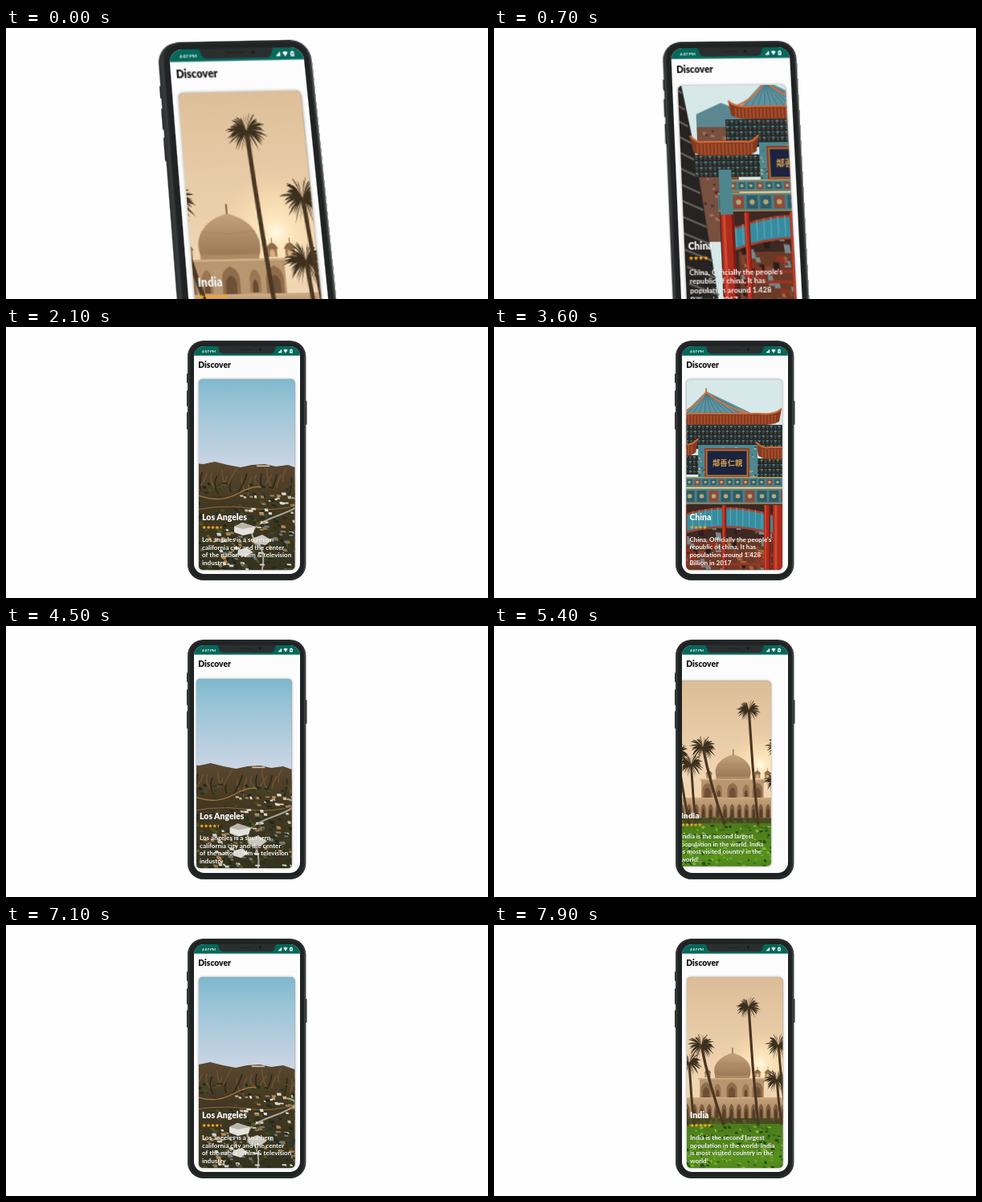
These frames come from a looping animation (600x338 px, 8 s). An HTML page:

```html
<!DOCTYPE html>
<html lang="en">
<head>
<meta charset="utf-8">
<title>Discover</title>
<style>
  html, body { margin: 0; width: 100%; height: 100%; overflow: hidden; background: #fefefe; }
  svg { display: block; width: 600px; height: 338px; overflow: visible; transform-origin: 0 0; }
  text { font-family: Lato, "Open Sans", sans-serif; font-weight: 700; }
  .head { font-weight: 900; }
  .cjk { font-family: "Noto Sans CJK SC", "Noto Sans CJK", sans-serif; }
  .copy { fill: #fff; filter: drop-shadow(0 .4px .6px rgba(0, 0, 0, .45)); }
  .shadow { filter: drop-shadow(0 .6px 1.6px rgba(0, 0, 0, .4)); }
</style>
</head>
<body>
<svg id="phone" viewBox="0 0 600 338">
  <defs>
    <clipPath id="screen"><rect x="234" y="24" width="132" height="284" rx="13"/></clipPath>
    <clipPath id="card"><rect x="240" y="65" width="119.5" height="238" rx="5"/></clipPath>
    <linearGradient id="dusk" x2="0" y2="1">
      <stop offset="0" stop-color="#d2b28e"/><stop offset=".35" stop-color="#e3c5a0"/><stop offset=".7" stop-color="#f0d5b2"/>
    </linearGradient>
    <radialGradient id="sun">
      <stop offset="0" stop-color="#fffbe8"/><stop offset=".2" stop-color="#ffebc2" stop-opacity=".9"/>
      <stop offset="1" stop-color="#ffdba4" stop-opacity="0"/>
    </radialGradient>
    <linearGradient id="stone" x2="0" y2="1">
      <stop offset="0" stop-color="#c4a27b"/><stop offset="1" stop-color="#987754"/>
    </linearGradient>
    <linearGradient id="lawn" x2="0" y2="1">
      <stop offset="0" stop-color="#4d7a1c"/><stop offset=".4" stop-color="#56901d"/><stop offset="1" stop-color="#2a5410"/>
    </linearGradient>
    <linearGradient id="day" x2="0" y2="1">
      <stop offset="0" stop-color="#5ba6c1"/><stop offset=".45" stop-color="#97c3d6"/><stop offset="1" stop-color="#d3d8e6"/>
    </linearGradient>
    <linearGradient id="hill" x2="0" y2="1">
      <stop offset="0" stop-color="#5b4730"/><stop offset=".3" stop-color="#433822"/><stop offset="1" stop-color="#2b301e"/>
    </linearGradient>
    <linearGradient id="body" x2="1" y2="0">
      <stop offset="0" stop-color="#3d4140"/><stop offset=".025" stop-color="#262929"/>
      <stop offset=".97" stop-color="#292c2c"/><stop offset="1" stop-color="#454948"/>
    </linearGradient>
  </defs>

  <g id="side">
    <g fill="#232626">
      <rect x="225" y="58" width="3" height="12" rx="1"/><rect x="225" y="79" width="3" height="20" rx="1"/>
      <rect x="225" y="106" width="3" height="22" rx="1"/><rect x="371.5" y="92" width="3" height="30" rx="1"/>
    </g>
    <rect x="226" y="17.500" width="147" height="298" rx="20" fill="#333636"/>
  </g>
  <rect x="226" y="17" width="147.5" height="299" rx="20" fill="url(#body)"/>
  <rect x="228.5" y="19.5" width="142.5" height="294" rx="18" fill="#202323"/>
  <g clip-path="url(#screen)">
    <rect x="234" y="24" width="132" height="284" fill="#fbfcfb"/>
    <g id="deck"></g>
    <rect x="234" y="24" width="132" height="11.7" fill="#04685a"/>
    <text class="head" x="239.3" y="51.4" font-size="10.3" fill="#111">Discover</text>
    <text x="244" y="32" font-size="4.5" fill="#fff">4:07 PM</text>
    <g fill="#fff">
      <path d="M338.500 32.300h4.600v-4.600z"/>
      <path d="M345.300 28.800q2.700-2 5.400 0l-2.700 3.600z"/>
      <path d="M353.200 28.200h1v-.7h1.600v.7h1v4.200h-3.600z"/>
      <path d="M354.200 29.600h1.600v1.200h-1.600z" fill="#04685a"/>
    </g>
  </g>
  <path d="M262 23.500h76q-2.500 1-3 4-1 5.800-6 5.800h-58q-5 0-6-5.800-.5-3-3-4z" fill="#2b2e2e"/>
  <rect x="290" y="27.400" width="18" height="1.400" rx=".7" fill="#222525"/>
  <circle cx="316.500" cy="28" r="1.700" fill="#171a22"/>
</svg>

<script>
let seed = 7;
const rnd = () => (seed = seed * 16807 % 2147483647) / 2147483647;
const between = (a, b) => a + (b - a) * rnd();
const range = n => [...Array(n).keys()];
const rep = (n, fn) => range(n).map(fn).join("");
const fix = v => v.toFixed(1);
const rect = (x, y, w, h, fill) => `<rect x="${fix(x)}" y="${fix(y)}" width="${fix(w)}" height="${fix(h)}" fill="${fill}"/>`;
const shape = (d, fill) => `<path d="${d}" fill="${fill}"/>`;
const line = (d, stroke, w) => `<path d="${d}" fill="none" stroke="${stroke}" stroke-width="${w}"/>`;

// Scattered small blocks, one path per colour
const specks = (n, x0, x1, y0, y1, w, h, colors) => colors.map(c => shape(rep(n, () => {
  const a = between(.5, 1.2) * w;
  return `M${fix(between(x0, x1))} ${fix(between(y0, y1))}h${fix(a)}l${fix(w * .2)} ${fix(h * between(.5, 1.2))}h${fix(-a)}z`;
}), c)).join("");

function palm(x, y, r, footX, footY, w) {
  const trunk = line(`M${x} ${y}Q${x + (footX - x) * .35} ${(y + footY) / 2} ${footX} ${footY}`, "#4a3723", w);
  const fronds = rep(46, i => {
    const a = (i + rnd()) / 46 * 2 * Math.PI, len = r * between(.65, 1.02);
    const dx = Math.cos(a) * len, dy = Math.sin(a) * len;
    const mx = x + dx * .6, my = y + dy * .6 - r * .2;
    const end = `${fix(x + dx)} ${fix(y + dy + r * .12)}`;
    return `M${x} ${y}Q${fix(mx)} ${fix(my)} ${end}Q${fix(mx)} ${fix(my + r * .18)} ${x} ${y}z`;
  });
  return trunk + shape(fronds, "#3c2f1e");
}

const arch = (x, y, w, h, fill) =>
  shape(`M${x - w / 2} ${y}v${-h * .55}Q${x - w / 2} ${y - h * .85} ${x} ${y - h}Q${x + w / 2} ${y - h * .85} ${x + w / 2} ${y - h * .55}V${y}z`, fill);

function india() {
  const kiosk = x => rect(x - 3.5, 184, 7, 6, "#a27c56") + shape(`M${x - 4.5} 184.500q4.500-8 9 0z`, "#8d6948") +
    rect(x - .3, 177, .6, 4, "#8d6948") + arch(x, 190, 3.5, 5, "#d9b184");
  return rect(150, 20, 300, 240, "url(#dusk)") +
    `<circle cx="332" cy="173" r="42" fill="url(#sun)"/>` +
    shape("M276 190C269 174 283 163 297 159.500 311 163 324 174 318 190z", "url(#stone)") +
    line("M297 153v7", "#7c5d3e", 1.2) +
    line("M275 180q22 3 44 0M276 187q21 3 42 0M278 172q19 3 38 0", "#a9845e", .5) +
    rect(275, 188, 43, 6, "#b08a64") + [266, 328, 341].map(kiosk).join("") +
    rect(256, 192, 80, 24, "#b89670") + rect(254, 191, 84, 1.5, "#cfae86") +
    [264, 296, 328].map(x => arch(x, 215, 13, 19, "#8f6c4b") + arch(x, 215, 8, 13, "#6d5036")).join("") +
    [278.5, 313.5].map(x => arch(x, 214, 8, 16, "#9a7651") + arch(x, 214, 4, 9, "#674a31")).join("") +
    rect(215, 215, 160, 31, "url(#stone)") + rect(215, 215, 160, 1.6, "#ceaa80") +
    rep(17, i => arch(222 + i * 9.2, 241, 6, 18, "#7d5c3d") + arch(222 + i * 9.2, 241, 3.6, 12, "#553d29")) +
    rect(150, 241, 300, 8, "#4b4a22") + specks(45, 150, 440, 239, 246, 4, 4, ["#3c431c", "#5b5a27"]) +
    rect(150, 248, 300, 110, "url(#lawn)") +
    specks(85, 180, 420, 250, 325, 4, 3, ["#6aa525", "#39691a", "#7fb832", "#24490f"]) +
    palm(243, 172, 17, 249, 250, 3) + palm(226, 158, 16, 241, 250, 3) +
    palm(352, 193, 17, 358, 249, 3) + palm(354, 150, 18, 365, 250, 3) +
    palm(258, 150, 19, 286, 250, 3.4) + palm(317, 102, 16, 329, 250, 3.2);
}

function china() {
  const roof = (x0, x1, y, h) => {
    const w = x1 - x0, rise = h * .45;
    const eave = `M${x0} ${y - rise}Q${x0 + 8} ${y + 2} ${x0 + w * .2} ${y}H${x1 - w * .2}Q${x1 - 8} ${y + 2} ${x1} ${y - rise}`;
    return shape(`${eave}L${x1 - 3} ${y + h * .7}Q${x1 - 10} ${y + h} ${x1 - w * .2} ${y + h}H${x0 + w * .2}Q${x0 + 10} ${y + h} ${x0 + 3} ${y + h * .7}z`, "#87391f") +
      rep(Math.floor(w / 4) - 3, i => line(`M${x0 + 8 + i * 4} ${y + 2}v${h - 3}`, "#bd6436", 1)) +
      line(eave, "#cf6a36", 2);
  };
  const brackets = (x, y, cols, rows) => rect(x, y, cols * 5, rows * 6, "#242a2b") +
    rep(cols * rows, i => {
      const bx = x + i % cols * 5, by = y + Math.floor(i / cols) * 6;
      return rect(bx + .7, by + 1, 3, 2, i % 2 ? "#4c7f83" : "#315a5d") + rect(bx + 1.5, by + 3.6, 1.4, 1.6, "#95503a");
    });
  const beam = (x, y, w, h, step) => rect(x, y, w, h, "#497f86") + rect(x, y, w, 1.2, "#c0a25d") + rect(x, y + h - 1.2, w, 1.2, "#b4824a") +
    rep(Math.floor(w / step), i => rect(x + i * step + 1.5, y + 3, step - 3, h - 6, i % 3 == 1 ? "#8d4a3b" : "#2f5b66") +
      `<circle cx="${x + (i + .5) * step}" cy="${y + h / 2}" r="${h * .14}" fill="#b3a878"/>`);
  const post = (x, w, y) => rect(x, y, w, 340 - y, "#ad2b1d") + rect(x + w * .15, y, w * .2, 340 - y, "#d04a30") + rect(x + w * .8, y, w * .2, 340 - y, "#7a1c14");
  return rect(130, 20, 310, 330, "#d6e8e8") +
    rect(186, 118, 44, 135, "#77503f") + specks(35, 188, 226, 120, 240, 4, 3, ["#a4705a", "#4b332b"]) +
    shape("M186 116l28-12 30 12v14h-58z", "#5b8791") +
    shape("M130 20h30l22 130 24 200h-76z", "#262322") +
    rep(17, i => line(`M${148 + i * 1.6} ${45 + i * 18}l${18 + i} 12`, "#67605a", 2)) +
    shape("M264 80L234 110H326z", "#5e93a2") + rep(11, i => line(`M264 82L${238 + i * 8} 110`, "#3f7180", .9)) +
    line("M264 76v6M264 81Q252 100 230 108M264 81Q290 103 328 110", "#cf7440", 2) +
    brackets(218, 122, 29, 5) + brackets(182, 160, 15, 4) + brackets(326, 164, 15, 4) +
    roof(178, 254, 146, 15) + roof(326, 408, 150, 15) + roof(222, 358, 108, 14) +
    rect(254, 147, 74, 42, "#4d8790") + specks(32, 254, 325, 148, 186, 2.2, 2.2, ["#bcae78", "#2e5c68"]) +
    rect(262, 151, 56, 37, "#8f4029") + rect(264, 153, 52, 33, "#b0763b") + rect(265.5, 154.500, 49, 30, "#1c2340") +
    `<text class="cjk" x="272" y="173" font-size="9.3" fill="#d8a54a">鄰善仁親</text>` +
    rect(207, 220, 230, 130, "#3d2822") + rect(226, 264, 120, 80, "#6b3a27") +
    specks(30, 224, 352, 225, 335, 6, 9, ["#7d4630", "#78888a", "#2a1d1a"]) +
    specks(16, 230, 335, 268, 335, 7, 6, ["#a2663a", "#96301f"]) +
    shape("M220 240Q290 212 360 240V263Q290 238 220 263z", "#368ca0") +
    line("M220 240Q290 212 360 240M220 262Q290 237 360 262", "#b13a25", 2.2) +
    rep(18, i => { const x = 224 + i * 7.8, y = 238 - 13 * (1 - ((x - 290) / 70) ** 2); return line(`M${x} ${y}v22`, "#72b2b8", .8); }) +
    line("M222 285H358M222 296H358", "#9d3324", 3) +
    post(208, 15, 222) + post(234, 6, 222) + post(284, 5, 222) + post(336, 8, 222) + post(347, 15, 222) +
    beam(208, 187, 200, 13, 10) + beam(206, 201, 203, 20, 15) + rect(208, 176, 14, 48, "#4f868d");
}

function angeles() {
  const ridge = "M150 178L200 171 240 174 254 171 270 175 286 178 300 175 316 174 330 177 345 175 362 181 390 178 450 186V345H150z";
  return rect(150, 20, 300, 170, "url(#day)") + shape(ridge, "url(#hill)") +
    rep(40, i => {
      const x = 176 + i * 6.2, y = between(178, 192);
      return line(`M${fix(x)} ${fix(y)}q${fix(between(-9, 1))} 9 ${fix(between(-12, 7))} ${fix(between(15, 25))}`, ["#6a5234", "#2c2819", "#6b5233"][i % 3], 1.7);
    }) +
    rect(306, 175.500, 16, 1.6, "#d4c8ae") +
    specks(110, 170, 430, 196, 325, 5, 3.5, ["#202717", "#35401f", "#4b4b26", "#273021"]) +
    line("M180 219Q218 208 240 215T282 211 312 203", "#a97943", 1.2) +
    line("M200 238Q255 222 300 229T390 211", "#8d6b42", 1) +
    line("M312 310Q319 282 304 268T333 238 350 216", "#aaa69b", 2) +
    specks(20, 282, 400, 207, 248, 4.5, 3, ["#c6b79d", "#a58058", "#dedbd0"]) +
    specks(28, 255, 400, 245, 318, 5.5, 3.6, ["#d2d0c9", "#b5824d", "#8f7553", "#6c7980"]) +
    specks(14, 190, 275, 262, 315, 4, 3, ["#b68146", "#79603c"]) +
    specks(24, 190, 400, 240, 318, 6, 5, ["#252e19", "#4d5226"]) +
    shape("M278 252l10-5 16 5-2 8-13 3-11-4z", "#e4e2dc") + shape("M278 252l10-5 16 5-15 3z", "#b8b4ab") +
    shape("M300 267l13-5 12 7-8 6-14-2z", "#ccc7bc") + shape("M283 281l11-3 7 6-9 6-10-3z", "#dddad1");
}

function stars(count) {
  const star = (cx, half) => {
    const pts = range(half ? 6 : 10).map(i => {
      const a = -Math.PI / 2 - i * Math.PI / 5, r = i % 2 ? 1.15 : 2.6;
      return `${fix(cx + r * Math.cos(a))},${fix(250 + r * Math.sin(a))}`;
    });
    return `<polygon points="${pts.join(" ")}" fill="#f9a51c"/>`;
  };
  return rep(Math.ceil(count), i => star(246.7 + i * 5.4, i + 1 > count));
}

const places = [
  { name: "India", rating: 5, photo: india,
    lines: ["India is the second largest", "population in the world. India", "is most visited country in the", "world!"] },
  { name: "China", rating: 4, photo: china,
    lines: ["China, Officially the people's", "republic of china, It has", "population around 1.428", "Billion in 2017"] },
  { name: "Los Angeles", rating: 4.5, photo: angeles,
    lines: ["Los angeles is a southern", "california city and the center", "of the nation's film & television", "industry"] }
];

const deck = document.getElementById("deck");
const phone = document.getElementById("phone"), side = document.getElementById("side");
deck.innerHTML = places.map(p => `<g>
  <rect class="shadow" x="240" y="65" width="119.5" height="238" rx="5" fill="#888"/>
  <g clip-path="url(#card)"><g class="photo">${p.photo()}</g></g>
  <g class="copy"><text class="head" x="244" y="241.2" font-size="10.5">${p.name}</text>
  ${p.lines.map((s, i) => `<text x="244" y="${267.7 + i * 9.8}" font-size="8.1">${s.replace("&", "&amp;")}</text>`).join("")}</g>
  ${stars(p.rating)}</g>`).join("");
const cards = [...deck.children];
const photos = cards.map(c => c.querySelector(".photo"));

const LOOP = 8000, SWIPE = 500, PAGE = 132;
const swipes = [100, 1200, 2200, 2950, 3580, 4450, 5300, 6200, 7150];
// Photo framing of the first visits: x, y, zoom
const framing = [[-19, 24, 1.3], [73, -20, 1], [6, -3, 1]];
const clamp = v => Math.min(1, Math.max(0, v));
const ease = v => (1 - Math.cos(Math.PI * clamp(v))) / 2;

// Perspective pose of the phone, from turned (u = 1) to facing front (u = 0)
function pose(u) {
  phone.style.transform = `matrix3d(${1 + .259 * u}, ${-.026 * u}, 0, 0, ${.069 * u}, ${1 + .304 * u}, 0, ${-.00017 * u},
    0, 0, 1, 0, ${-94.5 * u}, ${1.8 * u}, 0, 1)`;
  side.setAttribute("transform", `translate(${-3 * u} 0)`);
}

function draw(now) {
  const t = now % LOOP;
  pose((1 - clamp(t / 2100)) ** 2);

  const pos = swipes.reduce((sum, s) => sum + ease((t - s) / SWIPE), 0);
  const first = Math.floor(pos + 1e-6);
  cards.forEach((card, i) => {
    const page = [first, first + 1].find(k => k % 3 === i);
    card.style.display = page === undefined ? "none" : "";
    if (page === undefined) return;
    const dx = (page - pos) * PAGE, scale = 1 - .3 * Math.abs(page - pos);
    card.setAttribute("transform", `translate(${300 + dx} 184) scale(${scale}) translate(-300 -184)`);
    const [px, py, zoom] = framing[page] || [0, 0, 1];
    const lag = -45 * Math.tanh(dx / 40);
    photos[i].setAttribute("transform", `translate(${300 + px + lag} ${184 + py}) scale(${zoom}) translate(-300 -184)`);
  });
}

const start = performance.now();
function tick() {
  draw(performance.now() - start);
  requestAnimationFrame(tick);
}
draw(0);
requestAnimationFrame(tick);
</script>
</body>
</html>
```
